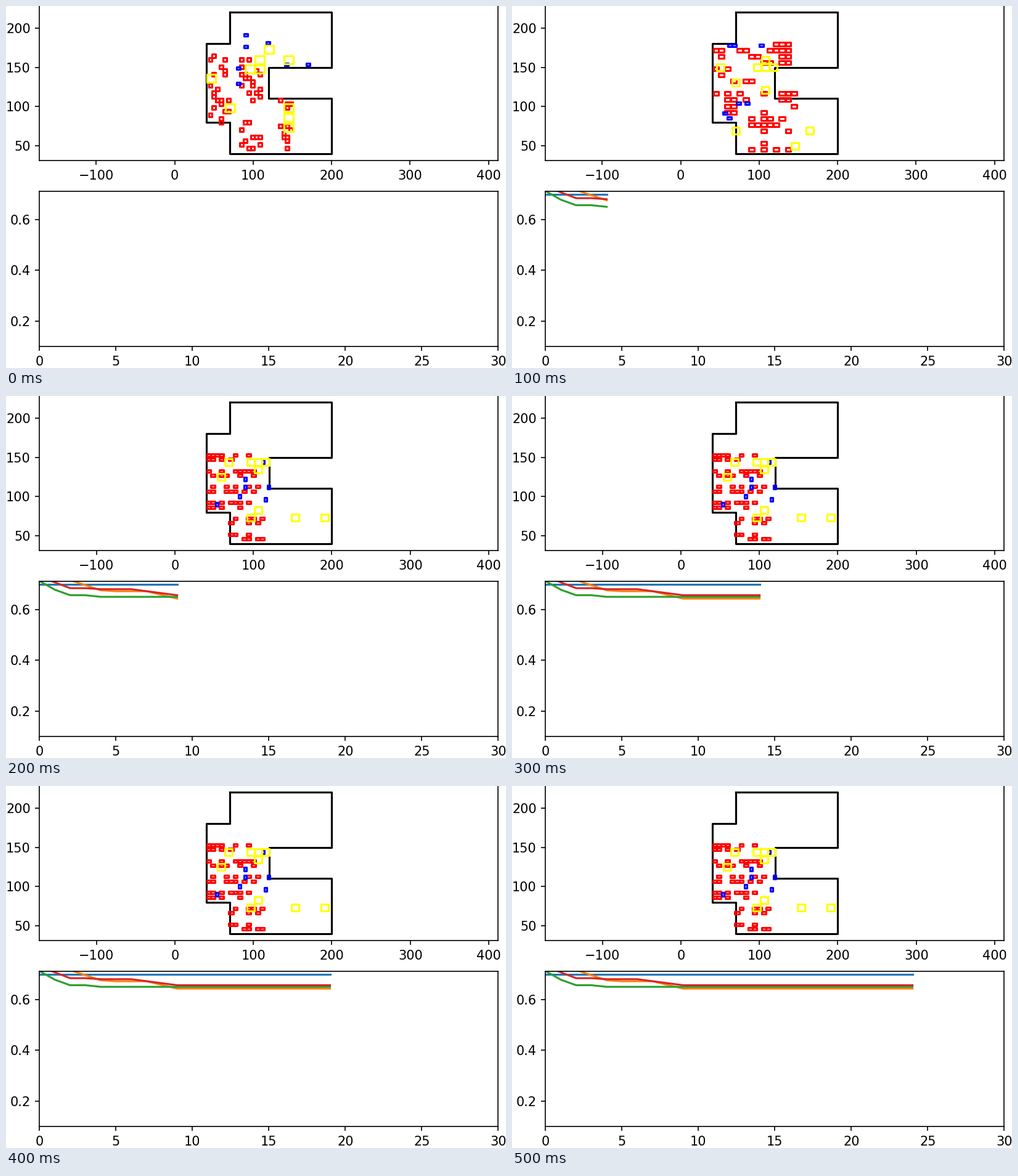
Write a matplotlib script that moves like this. It is 811 by 588 pixels and loops after 600 ms.

```python
import math
import random
from itertools import product

import matplotlib.pyplot as plt
import numpy as np
from matplotlib.animation import FuncAnimation
from matplotlib.collections import PolyCollection

W, H, DPI = 811, 588, 150
LEFT, AX_W, AX_H = 54.36, 744, 252
PLAN_BOTTOM, CHART_BOTTOM = 337.0, 34.6

plt.rcParams.update({"font.family": "DejaVu Sans", "font.size": 10})

WALLS = [(70, 220), (200, 220), (200, 150), (120, 150), (120, 110), (200, 110),
         (200, 40), (70, 40), (70, 80), (40, 80), (40, 180), (70, 180), (70, 220)]


def fill(zones, seed, cell):
    """Pick random lattice cells: each zone is (columns, rows, how many)."""
    rng = random.Random(seed)
    picked = set()
    for columns, rows, count in zones:
        picked.update(rng.sample(list(product(range(*columns), range(*rows))), count))
    return [cell(c, r) for c, r in sorted(picked)]


def run(x, y, n, dx=0.0, dy=0.0):
    return [(x + k * dx, y + k * dy) for k in range(n)]


# Lattices in stage pixels: three wings, one even grid, and paired rows.
def wing_cell(c, r):
    return (331.5, 382.5, 438.5)[c // 6] + 5.9 * (c % 6), 80.5 + 5.98 * r


def grid_cell(c, r):
    return 330.5 + 9.8 * c, 61 + 10.1 * r


def paired_cell(c, r):
    return 328.5 + 7.33 * c, 95.5 + 25.7 * (r // 2) + 7.4 * (r % 2)


# Each layout: colour -> (box size, box centres).
SCATTERED = {
    "red": ((6, 6), fill([((0, 6), (0, 19), 21), ((6, 12), (0, 14), 17),
                          ((6, 12), (18, 26), 11), ((12, 17), (12, 26), 12)],
                         3, wing_cell)),
    "blue": ((6, 4), run(389, 46.5, 2, dy=19) + run(377, 100, 2, dy=25.5)
             + run(455, 94, 2, dx=35.5) + [(425.5, 59.5)]),
    "yellow": ((15, 13), run(411.5, 86.5, 2, dx=47) + run(396, 101.5, 2, dx=16)
               + run(458.5, 165, 3, dy=15.75)
               + [(427, 69.5), (332.5, 117), (364, 165)]),
}
GROUPED = {
    "red": ((9, 6), fill([((10, 13), (0, 2), 6), ((0, 7), (1, 7), 12),
                          ((7, 14), (1, 4), 9), ((0, 14), (8, 13), 22),
                          ((6, 13), (13, 15), 7), ((6, 13), (16, 18), 5)],
                         5, grid_cell)),
    "blue": ((7, 4), run(354, 63.5, 2, dx=6.5) + run(368, 157, 2, dx=14)
             + run(346, 173.5, 2, dx=7, dy=8) + [(405, 63.5)]),
    "yellow": ((12, 11), run(398, 99, 3, dx=13) + run(363, 202, 2, dx=120.5)
               + [(411.5, 86.5), (338.5, 99), (363.5, 124), (411, 136), (459.5, 227)]),
}
PACKED = {
    "red": ((7, 4), fill([((0, 10), (0, 2), 10), ((0, 12), (2, 4), 12),
                          ((0, 13), (4, 8), 23), ((5, 13), (8, 12), 14)],
                         8, paired_cell)),
    "blue": ((4, 6), run(388.5, 134, 2, dy=13) + run(426, 147, 2, dx=-5, dy=20)
             + [(417.5, 106.5), (379.5, 162), (342.5, 175)]),
    "yellow": ((12, 11), run(397.5, 106.5, 3, dx=12) + run(469.5, 197, 2, dx=47.5)
               + run(409, 185, 2, dx=-11.5, dy=12)
               + [(361.5, 106.5), (409, 119), (349, 130.5)]),
}
LAYOUTS = [SCATTERED, GROUPED, PACKED]

# Scores settle: key (step, value) points; the last value holds.
SERIES = {
    "tab:blue": [(0, 0.7)],
    "tab:orange": [(0, 0.756), (4, 0.6757), (5, 0.672), (7, 0.672), (9, 0.643)],
    "tab:green": [(0, 0.712), (1, 0.678), (2, 0.6563), (3, 0.6563), (4, 0.65)],
    "tab:red": [(0, 0.73), (2, 0.684), (3, 0.684), (4, 0.68), (6, 0.68), (9, 0.6563)],
}


def box(cx, cy, w, h):
    """Corners of a pixel-aligned box in axes fractions of the plan."""
    x0 = math.floor(cx - w / 2) + 0.5
    y0 = math.floor(cy - h / 2) + 0.5
    corners = [(x0, y0), (x0 + w, y0), (x0 + w, y0 + h), (x0, y0 + h)]
    return [((x - LEFT) / AX_W, (H - y - PLAN_BOTTOM) / AX_H) for x, y in corners]


def add_axes(bottom):
    return fig.add_axes([LEFT / W, bottom / H, AX_W / W, AX_H / H])


fig = plt.figure(figsize=(W / DPI, H / DPI), dpi=DPI, facecolor="white")
plan, chart = add_axes(PLAN_BOTTOM), add_axes(CHART_BOTTOM)

plan.plot(*zip(*WALLS), color="black", lw=1.5)
plan.set_ylim(31, 229)
plan.set_xticks(range(-100, 401, 100))
plan.set_yticks(range(50, 201, 50))
half_span = 198 * AX_W / AX_H / 2  # equal scale on both axes

chart.set_xlim(0, 30)
chart.set_ylim(0.1, 0.71)
chart.set_xticks(range(0, 31, 5))
chart.set_yticks([0.2, 0.4, 0.6])

groups = {}
for order, name in enumerate(("red", "blue", "yellow")):
    groups[name] = PolyCollection([], facecolors="none", edgecolors=name, linewidths=1.5,
                                  transform=plan.transAxes, zorder=3 + order)
    plan.add_collection(groups[name], autolim=False)
curves = {color: chart.plot([], [], color=color, lw=1.5)[0] for color in SERIES}


def update(i):
    stage = min(i, 2)
    center = 119.75 if stage == 2 else 120
    plan.set_xlim(center - half_span, center + half_span)
    for name, (size, centres) in LAYOUTS[stage].items():
        groups[name].set_verts([box(x, y, *size) for x, y in centres])

    steps = np.arange(5 * i)
    for color, points in SERIES.items():
        curves[color].set_data(steps, np.interp(steps, *zip(*points)))
    return [*groups.values(), *curves.values()]


anim = FuncAnimation(fig, update, frames=6, interval=100, repeat=True,
                     repeat_delay=0, blit=False)
plt.show()
```
